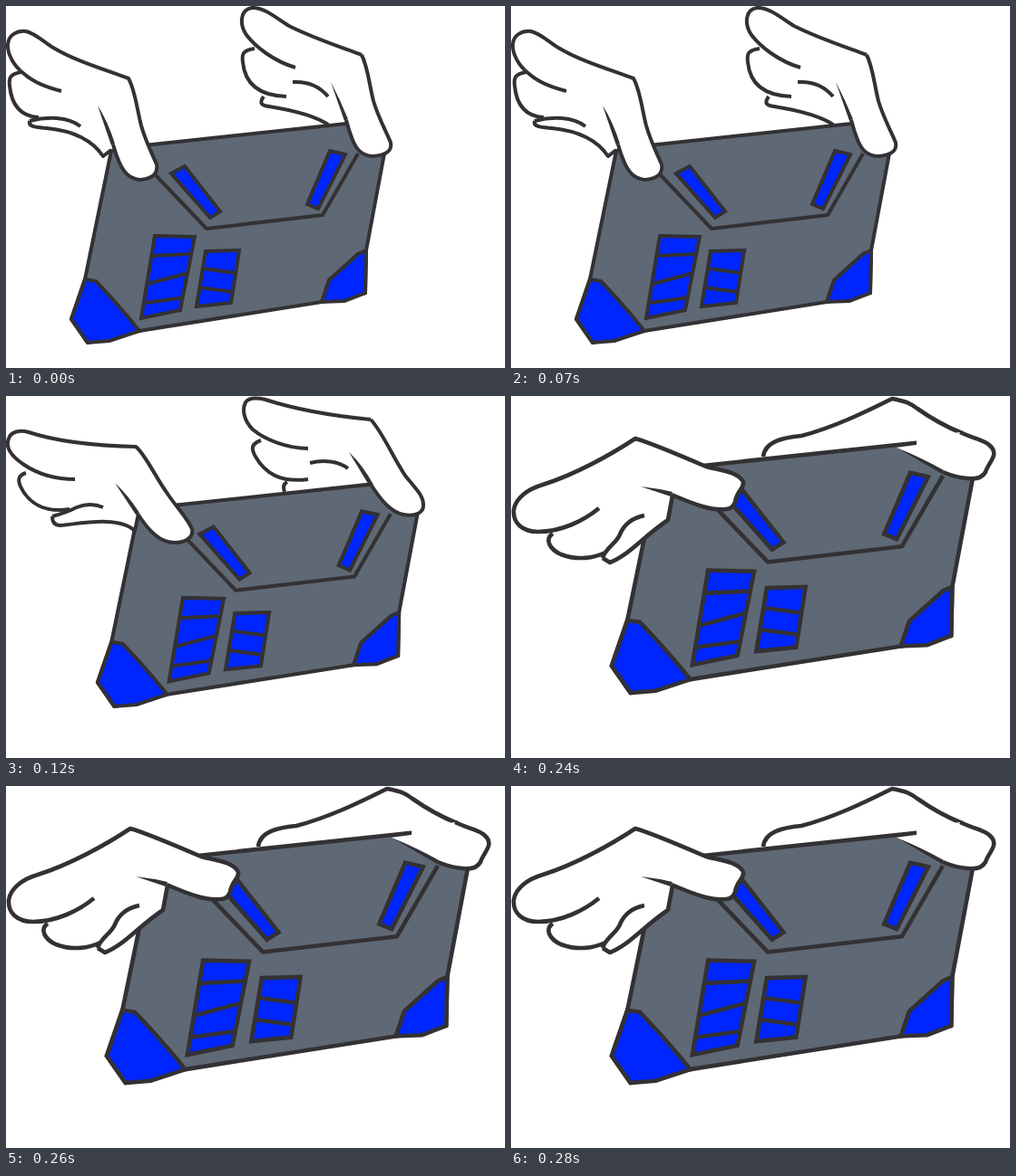
Animation of 550x400 px, one loop 0.32 s. Source, as an HTML page:

```html
<!DOCTYPE html>
<html lang="en">
<head>
<meta charset="utf-8">
<title>Flying briefcase</title>
<style>
  html, body { margin: 0; width: 100%; height: 100%; overflow: hidden; background: #fff; }
  svg { display: block; width: 550px; height: 400px; }
  path { stroke: #333133; stroke-width: 4; stroke-linejoin: round; fill: none; }
  .grey { fill: #5f6875; }
  .blue { fill: #0026ff; stroke-linejoin: miter; }
  .white { fill: #fff; }
  .patch { fill: #fff; stroke: none; }
  .taper { fill: #333133; stroke: none; }
  .big { stroke-width: 4.6; }
</style>
</head>
<body>
<svg id="stage" viewBox="0 0 550 400"></svg>
<script>
const path = (kind, d) => `<path class="${kind}" d="${d}"/>`;

const briefcase =
  path('grey', 'M116 160L157 153.5 375 130 417 163 397 270 396 317 348 327 147 359 90 372 72 346 87 302Z') +
  path('line', 'M165 187L221 246 349 231 388 163') +
  path('blue', 'M87 302L99 304Q118 324 134 343L147 359 114 370 90 372 72 346Z') +
  path('blue', 'M397 270L388 274 356 303 348 327 373 326 396 317Z') +
  path('blue', 'M182 185L197 177 236 227 225 234Z') +
  path('blue', 'M357 160L374 164 344 224 332 219Z') +
  path('blue', 'M164 254L208 255 192 336 149 345Z') +
  path('line', 'M161 276L204 274M156 307L199 295.5M153 328L194 322.5') +
  path('blue', 'M220 271L257 270 248 328 210 332Z') +
  path('line', 'M217 290L253 295M213 311L250 316');

// Each pose: briefcase matrix, the far wing behind it, then the parts in front.
const poses = [
  {
    until: 120,
    matrix: '1 0 0 1 0 0',
    behind:
      path('white', 'M284 100C279 107 281 110 290 111C315 115 340 121 355 131') +
      path('white', 'M274 47C260 49 260 54 261 62C263 83 275 99 309 100') +
      path('white', 'M319 68C295 61 275 45 265 32C257 20 258 4 271 2C285 1 300 15 312 22C335 34 365 44 392 54') +
      path('line', 'M316 84C332 83 345 88 355 100'),
    front:
      path('white', 'M392 54C399 68 400 85 405 105C411 125 419 138 424 151C426 161 417 165 405 166C392 166 386 158 382 148Q378 138 375 126') +
      path('taper', 'M358 84Q368 103 377 125L373 127Z') +
      path('white', 'M26 127C24 134 35 134 45 135C75 138 95 148 107 166L116 159') +
      path('white', 'M17 73C4 75 3 80 4 88C6 109 16 122 36 123') +
      path('white', 'M61 94C45 90 30 84 20 75C8 66 1 52 2 42C3 32 12 27 22 28C32 30 42 40 52 46C75 60 105 69 135 80C142 92 144 112 149 132C154 150 161 163 166 175C168 186 160 191 148 192C136 191 130 184 125 173Q121 164 118 153') +
      path('line', 'M26 127C45 122 68 122 82 133') +
      path('taper', 'M101 110Q112 127 120 152L116 154Z'),
  },
  {
    until: 240,
    matrix: '1.022 0 0 1.018 27.4 -35.7',
    behind:
      path('white', 'M310 95Q304 98 307 106') +
      path('white', 'M281 49C270 53 270 58 275 67C286 86 303 96 333 92') +
      path('white', 'M333 58C310 58 285 48 272 37C262 27 260 15 264 7C268 1 277 2 286 4C320 15 360 22 402 26') +
      path('line', 'M335 74C350 70 366 72 377 80'),
    front:
      path('white', 'M402 26C415 40 425 65 440 88C452 103 460 110 460 120C461 131 447 133 438 131C423 128 412 113 403 99') +
      path('taper', 'M378 62Q393 76 405 98L401 100Z') +
      path('white', 'M51 133C51 139 53 143 60 143C82 141 125 132 142 149L146 130') +
      path('white', 'M22 85C13 88 13 93 16 100C25 119 43 129 70 125') +
      path('white', 'M76 92C55 92 35 86 20 76C5 66 -1 56 3 47C5 40 14 37 25 40C55 50 100 55 143 56C152 62 165 90 178 108C188 123 200 135 205 147C207 156 198 162 186 162C170 162 158 150 145 130') +
      path('line', 'M51 133Q66 129 78 123Q93 117 107 123') +
      path('taper', 'M120 96Q135 110 147 129L143 131Z'),
  },
  {
    until: 320,
    matrix: '1.155 0 0 1.148 27.8 -99',
    behind:
      path('white big', 'M278 67C280 50 300 46 320 44C355 35 390 18 420 3C436 6 440 8 448 14Q472 31 497 41'),
    front:
      path('patch', 'M425 57L447 54 447 47 495 40 500 60 476 84Z') +
      path('white big', 'M495 40C512 48 524 49 530 57C537 66 526 74 523 84C519 91 510 92 503 91Q490 90 476 84') +
      path('taper', 'M425 57Q452 68 477 82L475 86Z') +
      path('patch', 'M101 180L143 101 177 110 173 137 109 184Z') +
      path('line big', 'M101 179L109 184C130 176 145 156 173 137L178 110') +
      path('white big', 'M46 152C37 158 42 169 55 175C73 182 92 179 104 173') +
      path('white big', 'M97 124C80 138 55 150 30 150C12 150 2 140 3 126C5 113 18 103 35 98C70 87 110 65 137 47C155 52 185 65 215 78C235 83 250 84 256 95C257 103 249 104 247 117Q244 125 237 125C222 127 205 121 177 109') +
      path('line big', 'M101 179C104 168 117 162 120 153Q127 136 147 132') +
      path('taper', 'M143 100Q161 102 178 106L176 111Z'),
  },
];

const stage = document.getElementById('stage');
stage.innerHTML = poses.map(pose =>
  `<g>${pose.behind}<g transform="matrix(${pose.matrix})">${briefcase}</g>${pose.front}</g>`
).join('');

const groups = [...stage.children];
const start = performance.now();

function draw() {
  const time = (performance.now() - start) % 320;
  const current = poses.findIndex(pose => time < pose.until);
  groups.forEach((group, i) => group.style.display = i === current ? 'inline' : 'none');
  requestAnimationFrame(draw);
}
draw();
</script>
</body>
</html>
```
